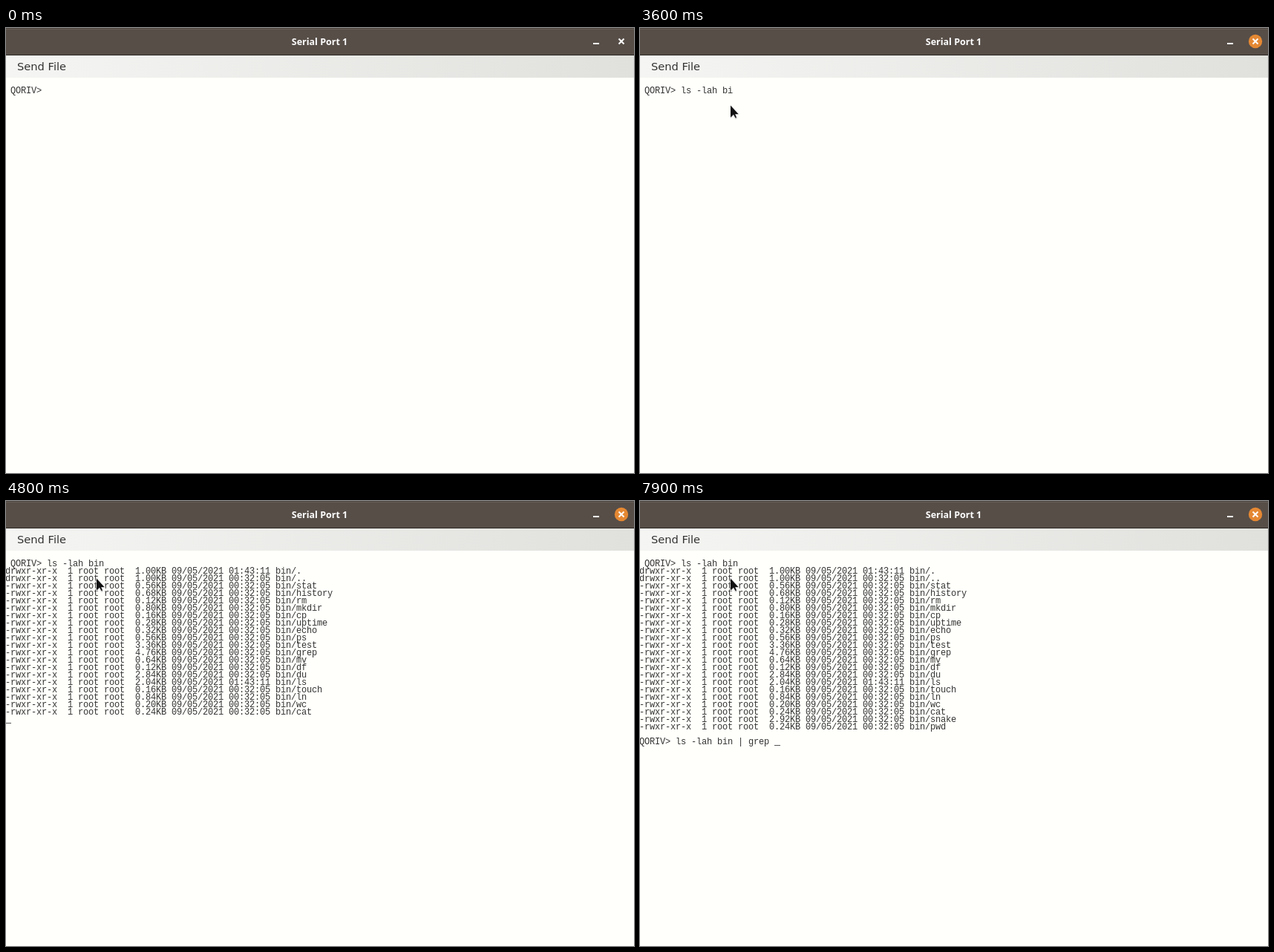
These frames come from a looping animation (846x600 px, 8 s). An HTML page:

```html
<!DOCTYPE html>
<html lang="en">
<head>
<meta charset="utf-8">
<title>Serial Port 1</title>
<style>
  html, body { margin: 0; width: 100%; height: 100%; overflow: hidden; background: #fffffb; }
  svg { position: absolute; left: 0; top: 0; }
  #screen {
    position: absolute; left: -1px; top: 80px; margin: 0; color: #333;
    font: 12px/10px "Liberation Mono", monospace;
    letter-spacing: calc(7px - 1ch);
  }
  #caret { position: absolute; width: 8px; height: 1px; background: #555; }
</style>
</head>
<body>
<pre id="screen"></pre>
<div id="caret"></div>
<svg width="846" height="600">
  <defs>
    <linearGradient id="menu">
      <stop stop-color="#f5f6f3"/>
      <stop offset="1" stop-color="#e0e0dd"/>
    </linearGradient>
  </defs>
  <rect width="846" height="37" fill="#574e48"/>
  <rect width="846" height="1" fill="#4a423d"/>
  <rect y="1" width="846" height="1" fill="#675e58"/>
  <rect y="36" width="846" height="1" fill="#2c2723"/>
  <rect y="37" width="846" height="30" fill="url(#menu)"/>
  <text x="422.5" y="23" text-anchor="middle" fill="#fff" font-family="'Noto Sans', sans-serif" font-size="12.5" font-weight="600">Serial Port 1</text>
  <text x="15" y="57" fill="#333" font-family="'DejaVu Sans', sans-serif" font-size="14.67">Send File</text>
  <rect x="791" y="20" width="8" height="2" fill="#fff"/>
  <circle id="hover" cx="829" cy="18" r="9.2" fill="#e58833"/>
  <path d="M825.5 14.5l7 7m0-7l-7 7" stroke="#fff" stroke-width="2"/>
  <g id="mouse">
    <path d="M0 0V17L4 13.5L6.5 18.5L9 17.5L7 12.5H11.5Z" fill="#bbb" stroke="#eee"/>
    <path d="M0 0V16L4 12L6.5 16.5L8 16L6 11.5H10.5Z" fill="#111"/>
  </g>
</svg>
<script>
const LOOP = 8000, TICK = 100;
const command = 'QORIV> ls -lah bin';
const files = `1.00 .,1.00 ..,0.56 stat,0.68 history,0.12 rm,0.80 mkdir,0.16 cp,0.28 uptime,
0.32 echo,0.56 ps,3.36 test,4.76 grep,0.64 mv,0.12 df,2.84 du,2.04 ls,0.16 touch,0.84 ln,
0.20 wc,0.24 cat,2.92 snake,0.24 pwd`.split(/,\s*/);

const listing = files.map((file, i) => {
  const [size, name] = file.split(' ');
  const time = name === '.' || name === 'ls' ? '01:43:11' : '00:32:05';
  return `${i < 2 ? 'd' : '-'}rwxr-xr-x  1 root root  ${size}KB 09/05/2021 ${time} bin/${name}`;
});
const lines = [' ' + command, ...listing, '', command + ' | grep '];
const log = lines.join('\n');
const at = (row, col) => lines.slice(0, row).reduce((sum, line) => sum + line.length + 1, col);

// All times below are in ticks.
const flips = [1, 2, 5, 7, 9, 11, 13, 15, 18, 20, 22, 24, 26, 28, 30, 32, 34, 36, 38, 40,
  42, 50, 52, 55, 57, 59, 61, 64, 66, 68, 69, 73, 75, 77, 79];
const firstKeys = [19, 21, 23, 25, 29, 31, 33, 34, 35, 36, 37];
const laterKeys = [53, 54, 62, 65, 67, 75, 76, 77, 78, 79];
const erases = [56, 57];
const recall = 58;
// Serial output progress: tick, row, column
const output = [[40, 1, 0], [42, 5, 0], [44, 10, 28], [46, 15, 40], [47, 15, 40],
  [48, 21, 0], [49, 23, 0], [50, 24, 7]].map(([t, row, col]) => [t, at(row, col)]);

const count = (times, t) => times.filter(time => time <= t).length;

function shownLength(t) {
  if (t < 40) return 8 + count(firstKeys, t);
  const next = output.findIndex(([time]) => time > t);
  if (next < 0) {
    return output.at(-1)[1] + count(laterKeys, t) - count(erases, t) + (t >= recall ? 11 : 0);
  }
  const [t0, n0] = output[next - 1], [t1, n1] = output[next];
  return Math.round(n0 + (n1 - n0) * (t - t0) / (t1 - t0));
}

const [screenBox, caret, hover, mouse] =
  ['screen', 'caret', 'hover', 'mouse'].map(id => document.getElementById(id));
const show = (el, on) => { el.style.visibility = on ? 'visible' : 'hidden'; };

function draw(now) {
  const t = Math.floor(now % LOOP / TICK);
  const text = log.slice(0, shownLength(t));
  const rows = text.split('\n');
  screenBox.textContent = text;
  caret.style.left = rows.at(-1).length * 7 - 1 + 'px';
  caret.style.top = 79 + rows.length * 10 + 'px';
  show(caret, count(flips, t) % 2);

  const left = (1 - Math.min(1, Math.max(0, (t - 5) / 6))) ** 2;
  mouse.setAttribute('transform', `translate(${122 + 707 * left} ${104.5 - 88 * left})`);
  show(mouse, t >= 5);
  show(hover, t >= 5);
  requestAnimationFrame(draw);
}
requestAnimationFrame(draw);
</script>
</body>
</html>
```
